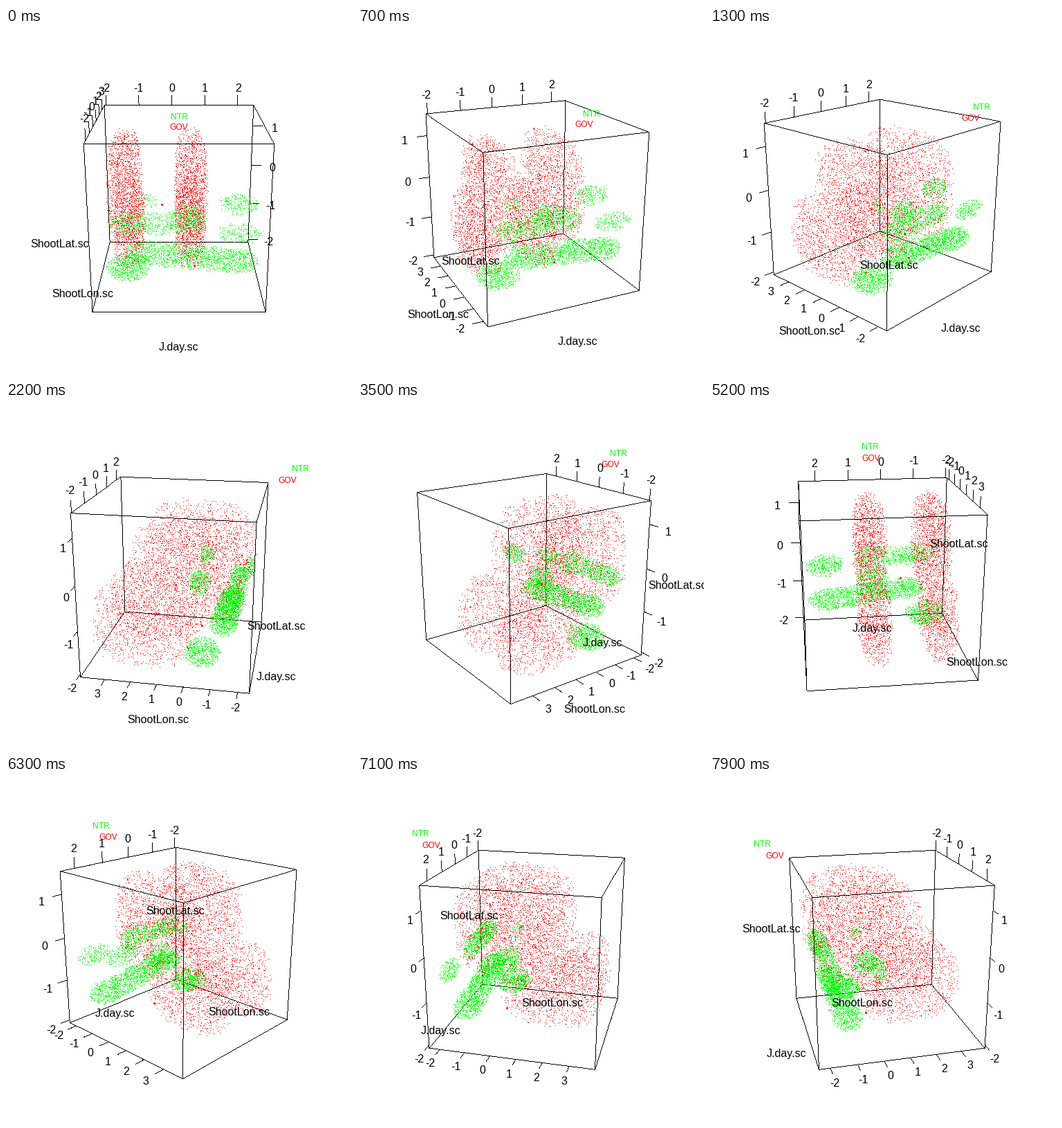
Animation of 500x500 px, one loop 8 s. Source, as a matplotlib script:

```python
import numpy as np
import matplotlib.pyplot as plt
from matplotlib.animation import FuncAnimation

SIZE, FRAMES, STEP = 500, 80, 3.6          # pixels, frames, degrees per frame
FOCAL, DIST, TILT = 933.0, 8.06, np.radians(20)
TICK = 2 / 15                              # tick length in box units
PX = 0.72                                  # points per pixel at 100 dpi
BLACK, RED, GREEN = (0, 0, 0), (255, 0, 0), (0, 255, 0)
rng = np.random.default_rng(11)

# Box coordinates (x, l, v): day, longitude, latitude, each from -1 to 1.
DAY = [(n, -0.097 + 0.4405 * n) for n in range(-2, 3)]
LON = [(n, -0.240 + 0.314 * n) for n in range(-2, 4)]
LAT = [(n, 0.157 + 0.558 * n) for n in range(-2, 2)]


def project(pts, th):
    """Screen x, y and eye distance of box points turned by th."""
    x, l, v = np.asarray(pts, float).T
    c, s = np.cos(th), np.sin(th)
    right = x * c - l * s
    near = -x * s - l * c
    depth = DIST - near * np.cos(TILT) - v * np.sin(TILT)
    up = v * np.cos(TILT) - near * np.sin(TILT)
    return SIZE / 2 + FOCAL * right / depth, SIZE / 2 - FOCAL * up / depth, depth


def fill(blobs, density, power):
    """Even random points inside a union of (super)ellipsoids."""
    pts = rng.uniform(-1, 1, (8 * density, 3))
    inside = [(np.abs((pts - c) / r) ** power).sum(axis=1) < 1 for c, r in blobs]
    return pts[np.any(inside, axis=0)]


def band(start, end, radii, count=5):
    return [(c, radii) for c in np.linspace(start, end, count)]


# Two seasons of the same region: a northern and a southern lobe each.
red = fill([((day, l, v), (.2, rl, rv)) for day in (-.645, .145)
            for l, v, rl, rv in ((-.25, .29, .70, .66), (.3, -.42, .65, .54))],
           2700, 3)
green = fill(
    band((-.58, -.76, 0), (.10, -.74, 0), (.24, .12, .14))
    + band((-.38, -.62, -.43), (.68, -.60, -.54), (.27, .18, .15))
    + [((.72, -.25, .05), (.25, .10, .14)),
       ((.70, -.81, -.09), (.27, .09, .13)),
       ((.10, -.25, -.12), (.22, .14, .17)),
       ((-.38, -.28, .10), (.13, .07, .09)),
       ((-.62, -.40, -.72), (.28, .23, .16))], 16500, 2)

cloud = np.vstack([red, green])
cloud_rgb = np.array([RED] * len(red) + [GREEN] * len(green))
means = [(-.216, 0, -.05), (.19, -.27, -.757)]

Q, Q2 = 1 + 2 * TICK, 1 + 3 * TICK
captions = [
    ("J.day.sc", (0, -Q, -Q), 16, "black"),
    ("ShootLon.sc", (-Q, 0, -Q), 16, "black"),
    ("ShootLat.sc", (-Q, -Q, 0), 16, "black"),
    ("GOV", (0, -Q, Q), 12, "#ff0000"),
    ("NTR", (0, -Q2, Q2), 12, "#00ff00"),
]

corners = [(x, l, v) for x in (-1, 1) for l in (-1, 1) for v in (-1, 1)]
edges = [(a, b) for a in corners for b in corners
         if a < b and sum(p != q for p, q in zip(a, b)) == 1]

fig = plt.figure(figsize=(5, 5), dpi=100, facecolor="white")
ax = fig.add_axes([0, 0, 1, 1])
image = ax.imshow(np.full((SIZE, SIZE, 3), 255, np.uint8),
                  extent=(0, SIZE, SIZE, 0), interpolation="nearest",
                  aspect="auto")
ax.set(xlim=(0, SIZE), ylim=(SIZE, 0))
ax.axis("off")
dots, = ax.plot([], [], "o", color="#ff0000", ms=3 * PX, mew=0)


def label(text, size, color):
    return ax.text(0, 0, text, size=size * PX, color=color, ha="center",
                   va="baseline", family="Liberation Sans")


caption_texts = [label(t, s, c) for t, _, s, c in captions]
tick_texts = [label(str(n), 16, "black") for n, _ in DAY + LON + LAT]


def place(text, pos, th):
    x, y, _ = project([pos], th)
    text.set_position((x[0], y[0] + 0.53 * text.get_size() / PX))


def stroke(a, b, th):
    """One-pixel line as rows of screen x, y and depth."""
    p, q = np.column_stack(project([a, b], th))[:, :]
    count = int(np.abs(q - p)[:2].max()) + 2
    return np.linspace(p, q, count)


def tick_layout(th):
    """Base point, outward direction and label reach of every tick."""
    xf = -1 if np.sin(th) > 1e-9 else 1    # sides facing the viewer
    lf = -1 if np.cos(th) > 0 else 1
    up, out = np.array([0, 0, 1]), np.array([xf, 0, 0])
    ticks = [((p, -lf, 1), up, 2) for _, p in DAY]
    if abs(np.sin(th)) < np.tan(TILT):
        ticks += [((-xf, p, 1), up, 2) for _, p in LON]
    else:
        ticks += [((xf, p, -1), out, 2.1) for _, p in LON]
    return ticks + [((xf, -lf, p), out, 2.2) for _, p in LAT]


def draw(i):
    th = np.radians(STEP * i)
    ticks = tick_layout(th)
    marks = [(b, np.add(b, d * TICK)) for b, d, _ in ticks]
    lines = np.vstack([stroke(a, b, th) for a, b in edges + marks])

    # Paint everything from far to near, so lines and points hide each other.
    spots = np.vstack([np.column_stack(project(cloud, th)), lines])
    rgb = np.vstack([cloud_rgb, np.tile(BLACK, (len(lines), 1))])
    order = np.argsort(-spots[:, 2])
    cols, rows = spots[order, :2].astype(int).T
    buf = np.full((SIZE, SIZE, 3), 255, np.uint8)
    buf[rows, cols] = rgb[order]
    image.set_data(buf)
    dots.set_data(*project(means, th)[:2])

    for text, (_, pos, _, _) in zip(caption_texts, captions):
        place(text, pos, th)
    for text, (base, d, reach) in zip(tick_texts, ticks):
        place(text, np.add(base, d * TICK * reach), th)
    return [image, dots, *caption_texts, *tick_texts]


anim = FuncAnimation(fig, draw, frames=FRAMES, interval=100,
                     init_func=lambda: draw(0), repeat=True, repeat_delay=0)
plt.show()
```
